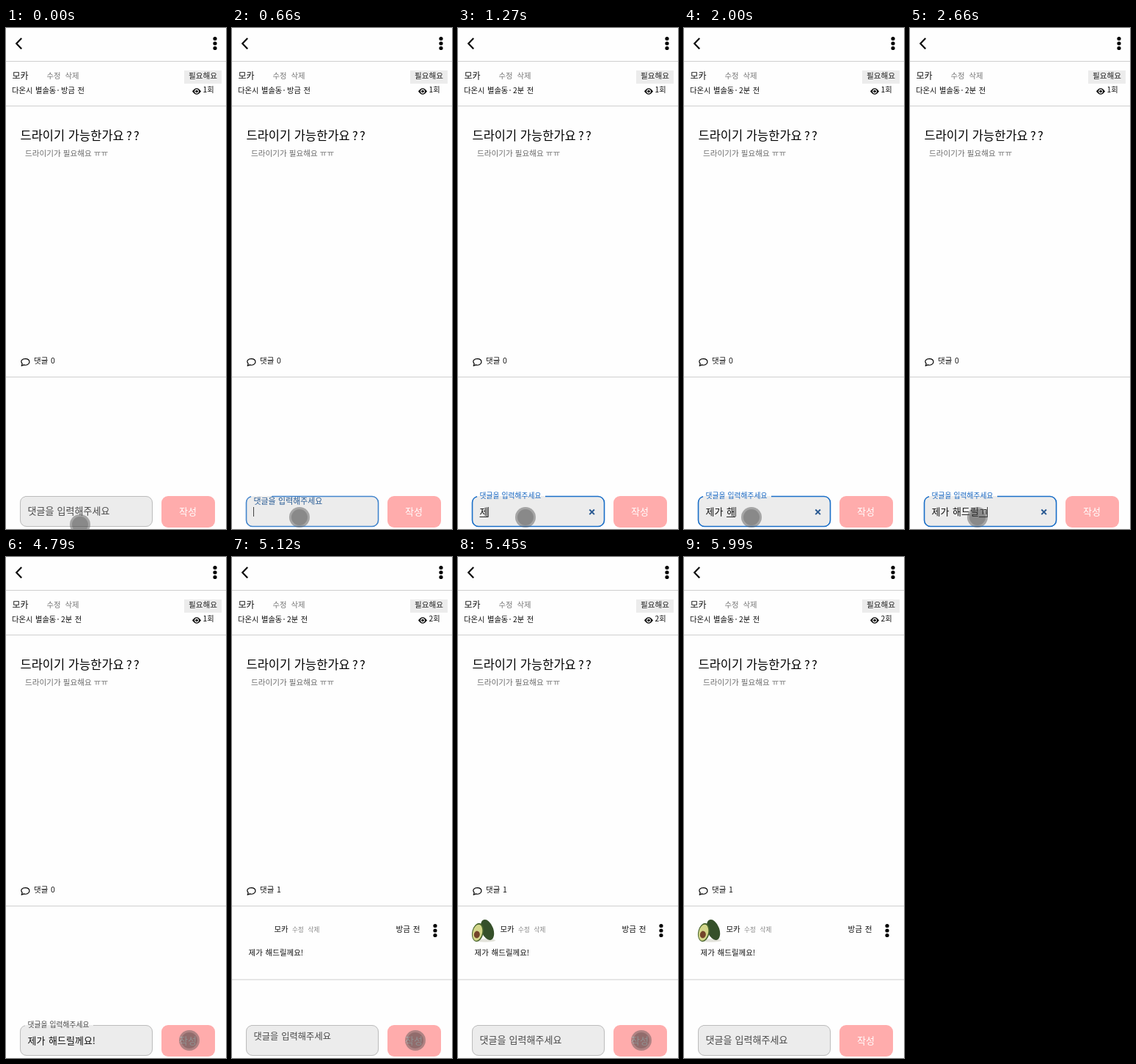
Animation, 300 px wide and 684 px high, one loop 6190 ms. Source, as an HTML page:

```html
<!DOCTYPE html>
<html lang="ko">
<head>
<meta charset="utf-8">
<title>댓글 작성</title>
<style>
html, body { margin: 0; width: 100%; height: 100%; overflow: hidden; background: #fefefe; }
svg { display: block; width: 300px; height: 684px; }
text { font-family: "Noto Sans CJK KR", "Noto Sans CJK", "Noto Sans CJK JP", sans-serif; white-space: pre; }
</style>
</head>
<body>
<svg id="stage" viewBox="0 0 300 684" lang="ko"></svg>
<script>
const LOOP = 6190, STEP = 66.5;
const FOCUS = 605, BLUR = 4790, SUBMIT = 5037, AVATAR = 5450;
const stage = document.getElementById('stage');

function el(tag, attrs, parent = stage) {
  const node = document.createElementNS('http://www.w3.org/2000/svg', tag);
  set(node, attrs);
  parent.appendChild(node);
  return node;
}
function set(node, attrs) {
  for (const k in attrs) node.setAttribute(k, attrs[k]);
}
function text(x, y, size, str, fill = '#111', extra = {}, parent = stage) {
  const node = el('text', { x, y, 'font-size': size, fill, ...extra }, parent);
  node.textContent = str;
  return node;
}
const rule = (y, parent) => el('rect', { x: 0, y, width: 300, height: 1, fill: '#cfcfcf' }, parent);
const menu = (x, y, parent) => [-6.5, 0, 6.5].forEach(d => el('circle', { cx: x, cy: y + d, r: 2.6 }, parent));
const show = (node, on) => node.setAttribute('visibility', on ? 'visible' : 'hidden');
const medium = { 'font-weight': 500 };

// Header and post
el('path', { d: 'M21.2 14L14.2 21.2L21.2 28.4', fill: 'none', stroke: '#000', 'stroke-width': 2.1 });
menu(285, 21);
[45, 106, 476].forEach(y => rule(y));
text(8.5, 69.8, 12, '모카', '#111', medium);
text(55.5, 69.3, 10.4, '수정', '#777');
text(80.5, 69.3, 10.4, '삭제', '#777');
text(8, 88.5, 10.3, '다온시 별솔동', '#111', { 'word-spacing': 0.6 });
el('circle', { cx: 71, cy: 85, r: 0.8, fill: '#111' });
const posted = text(75, 88.5, 10.3, '', '#111', { 'word-spacing': 0.6 });
el('rect', { x: 243, y: 58, width: 51, height: 18, fill: '#ececec' });
text(249, 68.5, 10.6, '필요해요', '#222');
el('path', { d: 'M254 86.5Q260 78 266 86.5Q260 95 254 86.5Z' });
el('circle', { cx: 260, cy: 86.5, r: 2.9, fill: '#fff' });
el('circle', { cx: 260, cy: 86.5, r: 1.8 });
const views = text(268.5, 87.5, 10.3, '');
text(19.5, 152.8, 16.5, '드라이기 가능한가요', '#000', medium);
text(164, 152.8, 16.5, '??', '#000', { ...medium, 'letter-spacing': 2.2 });
text(26, 174.5, 10.6, '드라이기가 필요해요 ㅠㅠ', '#6b6b6b');
el('path', {
  d: 'M21.2 461.2L22.2 458.4C18.8 453.8 22.6 451.7 26.3 451.7C29.8 451.7 31.9 453.6 31.9 455.9C31.9 459.2 28 461 24.3 459.9Z',
  fill: 'none', stroke: '#000', 'stroke-width': 1.2, 'stroke-linejoin': 'round'
});
const count = text(38, 457.5, 10.5, '', '#111', { 'word-spacing': 0.8 });

// Posted comment
const comment = el('g', {});
text(57.5, 512, 10.4, '모카', '#111', medium, comment);
text(82, 511.5, 8.6, '수정', '#888', {}, comment);
text(103.5, 511.5, 8.6, '삭제', '#888', {}, comment);
text(223.5, 511.5, 10.6, '방금 전', '#111', { 'word-spacing': 0.8 }, comment);
menu(277, 510, comment);
text(22.5, 543.5, 10.5, '제가 해드릴께요!', '#111', { 'word-spacing': 0.8 }, comment);
rule(576.5, comment);

const avatar = el('g', {});
const oval = (cx, cy, rx, ry, fill, turn) =>
  el('ellipse', { cx, cy, rx, ry, fill, transform: `rotate(${turn} ${cx} ${cy})` }, avatar);
oval(37, 523.5, 14, 2.2, '#e2e2da', 0);
oval(40, 509, 8.2, 14.5, '#35502a', -20);
oval(27, 512.5, 7.8, 12.8, '#46632c', 12);
oval(26.6, 512.8, 6.4, 11.3, '#d3d68a', 12);
oval(25.8, 515.5, 4, 4.9, '#74452a', 8);

// Input and button
el('rect', { x: 19, y: 639, width: 181, height: 42, rx: 9, fill: '#ececec' });
const border = el('path', { fill: 'none' });
const label = text(0, 0, 13, '댓글을 입력해주세요', '#444', { 'word-spacing': 0.6 });
const typed = text(29.5, 665, 13, '', '#111', { ...medium, 'word-spacing': 1 });
const underline = el('rect', { y: 667, height: 1, width: 12, fill: '#222' });
const caret = el('rect', { y: 654, width: 1, height: 13, fill: '#444' });
const clear = el('path', { d: 'M179.3 657.5l6.6 6.6m0-6.6l-6.6 6.6', stroke: '#2a5a92', 'stroke-width': 2 });
el('rect', { x: 212, y: 639, width: 73, height: 43, rx: 9, fill: '#ffacac' });
text(236, 664.8, 13, '작성', '#fff', medium);

const pointer = el('g', {});
el('circle', { r: 14, fill: '#555', opacity: 0.47 }, pointer);
el('circle', { r: 11, opacity: 0.17 }, pointer);

// [time, value...], each held until the next
const moves = [
  [0, 101, 678], [70, 97, 675], [140, 93, 671], [400, 92, 668], [3990, 153, 680],
  [4060, 180, 720], [4260, 289, 662], [4330, 268, 661], [4390, 254, 660], [4460, 250, 660],
  [5650, 253, 661], [5850, 258, 666], [5920, 266, 673], [5990, 280, 720]
];
// The last field tells whether the final syllable is still being composed
const typing = [
  [0, '', 0], [1140, 'ㅈ', 1], [1270, '제', 1], [1400, '제ㄱ', 1], [1470, '제가', 1],
  [1740, '제가 ', 0], [1870, '제가 ㅎ', 1], [2000, '제가 해', 1], [2130, '제가 해ㄷ', 1],
  [2260, '제가 해드', 1], [2330, '제가 해들', 1], [2400, '제가 해드리', 1], [2460, '제가 해드릴', 1],
  [2660, '제가 해드릴ㄲ', 1], [2730, '제가 해드릴께', 1], [2870, '제가 해드릴께ㅇ', 1],
  [2930, '제가 해드릴께요', 1], [3260, '제가 해드릴께요!', 0], [SUBMIT, '', 0]
];
const held = (list, t) => list.filter(k => k[0] <= t).pop();

const clamp = v => Math.max(0, Math.min(1, v));
// cubic-bezier(0, 0, .2, 1)
function easeOut(x) {
  let lo = 0, hi = 1;
  for (let i = 0; i < 24; i++) {
    const u = (lo + hi) / 2;
    if (0.6 * u * u + 0.4 * u ** 3 < x) lo = u; else hi = u;
  }
  return 3 * lo * lo - 2 * lo ** 3;
}
const ramp = (t, start, length) => easeOut(clamp((t - start) / length));
const mix = (a, b, p) => `rgb(${a.map((v, i) => Math.round(v + (b[i] - v) * p))})`;

function drawField(t) {
  const s = Math.floor((t + 6) / STEP) * STEP;
  const shrink = ramp(s, FOCUS, 200) - ramp(s, SUBMIT, 200);
  const notch = 93 * (ramp(s, FOCUS + 50, 100) - ramp(s, SUBMIT, 50));
  const focused = t >= FOCUS && t < BLUR;
  const tint = focused ? ramp(s, FOCUS, 200) : 0;
  set(label, {
    transform: `translate(29.5 ${663.7 - 21.9 * shrink}) scale(${1 - 0.25 * shrink})`,
    fill: mix([72, 72, 72], [21, 101, 192], tint)
  });
  set(border, {
    d: `M${26 + notch} 639.5H191a8.5 8.5 0 0 1 8.5 8.5v24a8.5 8.5 0 0 1-8.5 8.5H28a8.5 8.5 0 0 1-8.5-8.5v-24a8.5 8.5 0 0 1 6.5-8.2`,
    stroke: focused ? mix([140, 175, 215], [25, 110, 200], tint) : '#bcbcbc',
    'stroke-width': focused ? 1.6 : 1
  });

  const [since, str, composing] = held(typing, t);
  if (typed.textContent !== str) typed.textContent = str;
  const end = 29.5 + (str ? typed.getComputedTextLength() : 0);
  set(caret, { x: Math.round(end - 0.5) });
  set(underline, { x: end - 12 });
  show(underline, composing);
  show(caret, focused && (t - Math.max(since, FOCUS)) % 1060 < 530);
  show(clear, str && focused);
}

function draw(t) {
  const sent = t >= SUBMIT;
  posted.textContent = t < 1140 ? '방금 전' : '2분 전';
  views.textContent = sent ? '2회' : '1회';
  count.textContent = sent ? '댓글 1' : '댓글 0';
  show(comment, sent);
  show(avatar, t >= AVATAR);
  drawField(t);
  const [, x, y] = held(moves, t);
  set(pointer, { transform: `translate(${x} ${y})` });
}

const start = performance.now();
function tick() {
  draw((performance.now() - start) % LOOP);
  requestAnimationFrame(tick);
}
tick();
</script>
</body>
</html>
```
